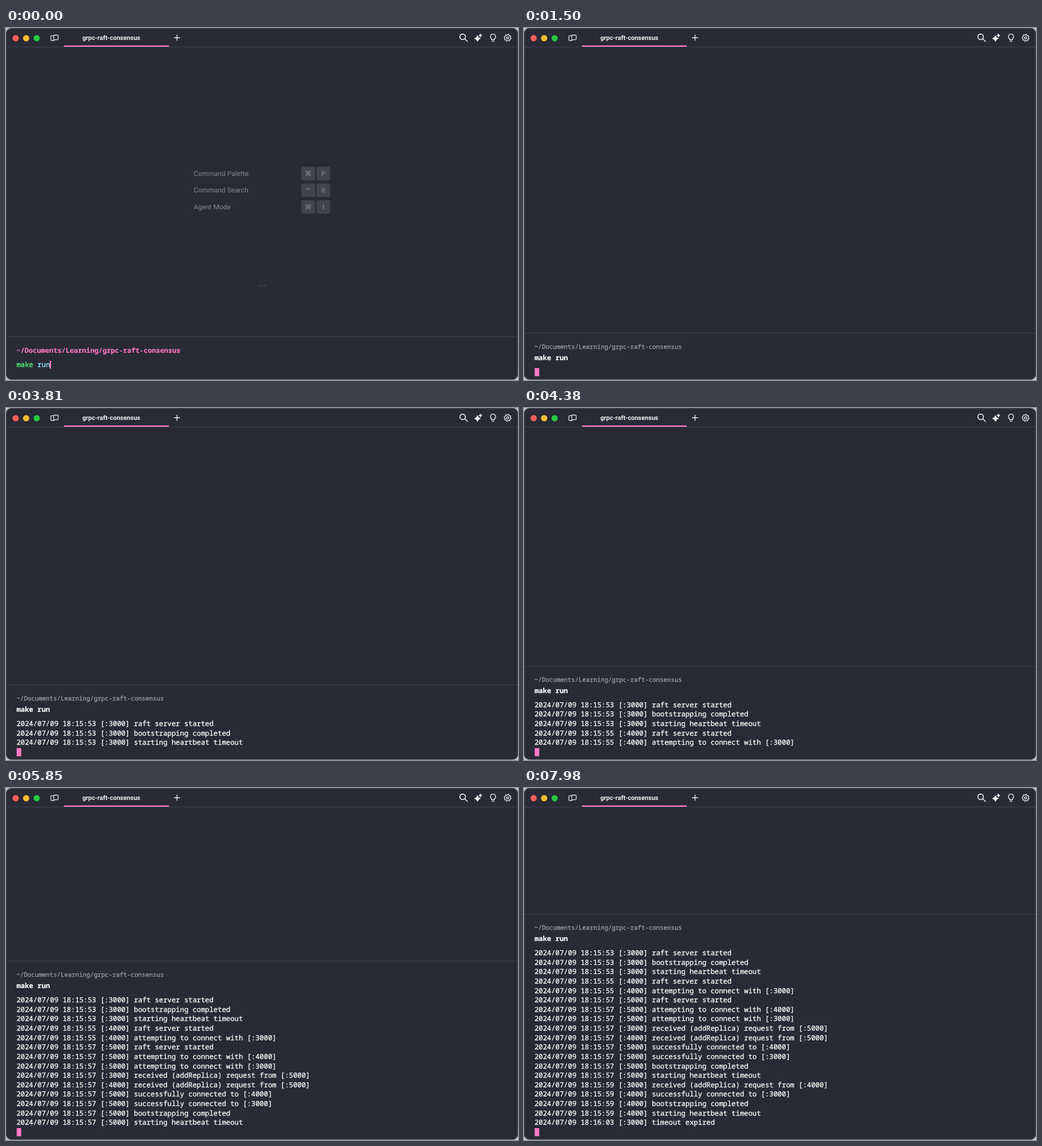
These frames come from a looping animation (902 px wide and 621 px high, 8000 ms). An HTML page with a canvas:

```html
<!DOCTYPE html>
<html lang="en">
<head>
<meta charset="utf-8">
<title>Terminal</title>
<style>
html, body { margin: 0; width: 100%; height: 100%; overflow: hidden; background: #c3c4c8; }
canvas { display: block; width: 902px; height: 621px; }
</style>
</head>
<body>
<canvas id="stage"></canvas>
<script>
const W = 902, H = 621, LOOP = 8000;
const BG = '#282a36', FG = '#f8f8f2', PINK = '#ff79c6', LINE = '#41434e', DIM = '#8a8b90';
const MONO = '"Noto Sans Mono", "DejaVu Sans Mono", monospace';
const UI = 'Roboto, Inter, sans-serif';
const LEFT = 18.4, ROW = 16.61, SIZE = 12.32;
const PATH = '~/Documents/Learning/grpc-raft-consensus';
const BLINK = 510, ENTER = 660;

const start = 'raft server started';
const boot = 'bootstrapping completed';
const beat = 'starting heartbeat timeout';
const dial = p => `attempting to connect with [:${p}]`;
const recv = p => `received (addReplica) request from [:${p}]`;
const done = p => `successfully connected to [:${p}]`;

// Each batch: time of arrival, clock, then [port, message] rows
const batches = [
  [2310, '15:53', [3000, start], [3000, boot], [3000, beat]],
  [3930, '15:55', [4000, start], [4000, dial(3000)]],
  [4710, '15:57', [5000, start], [5000, dial(4000)], [5000, dial(3000)]],
  [4950, '15:57', [3000, recv(5000)], [4000, recv(5000)], [5000, done(4000)],
    [5000, done(3000)], [5000, boot], [5000, beat]],
  [6030, '15:59', [3000, recv(4000)], [4000, done(3000)], [4000, boot], [4000, beat]],
  [7530, '16:03', [3000, 'timeout expired']]
];
const log = batches.flatMap(([at, clock, ...rows]) =>
  rows.map(([port, msg]) => ({ at, text: `2024/07/09 18:${clock} [:${port}] ${msg}` })));

const canvas = document.getElementById('stage');
const dpr = window.devicePixelRatio || 1;
canvas.width = W * dpr;
canvas.height = H * dpr;
const c = canvas.getContext('2d');
c.scale(dpr, dpr);
c.textRendering = 'geometricPrecision';

function text(str, x, y, font, color, align = 'left') {
  c.font = font;
  c.fillStyle = color;
  c.textAlign = align;
  c.fillText(str, x, y);
}

// Terminal text, with a hairline outline for a medium weight
function mono(str, x, y, color, size = SIZE, weight = 400) {
  text(str, x, y, `${weight} ${size}px ${MONO}`, color);
  c.strokeStyle = color;
  c.lineWidth = weight > 400 ? 0.15 : 0.35;
  c.lineJoin = 'round';
  c.strokeText(str, x, y);
}

function box(x, y, w, h, color, r = 0) {
  c.fillStyle = color;
  c.beginPath();
  c.roundRect(x, y, w, h, r);
  c.fill();
}

function disc(x, y, r, color) {
  c.fillStyle = color;
  c.beginPath();
  c.arc(x, y, r, 0, 7);
  c.fill();
}

function stroke(d, color = '#f0f0f0', width = 1.4) {
  c.strokeStyle = color;
  c.lineWidth = width;
  c.lineCap = c.lineJoin = 'round';
  c.stroke(new Path2D(d));
}

function sparkle(x, y, r) {
  c.fillStyle = '#f4f4f4';
  c.beginPath();
  for (let i = 0; i < 8; i++) {
    const a = i * Math.PI / 4, k = i % 2 ? r * 0.5 : r;
    c.lineTo(x + k * Math.cos(a), y + k * Math.sin(a));
  }
  c.fill();
}

function gear(x, y) {
  let d = '';
  for (let i = 0; i < 32; i++) {
    const a = (i + 0.5) * Math.PI / 16, r = i % 4 < 2 ? 6.1 : 4.9;
    d += `${i ? 'L' : 'M'}${x + r * Math.cos(a)} ${y + r * Math.sin(a)}`;
  }
  stroke(d + 'Z', '#f0f0f0', 1.25);
  stroke(`M${x - 2} ${y}a2 2 0 1 0 4 0a2 2 0 1 0 -4 0`, '#f0f0f0', 1.25);
}

function frame() {
  c.fillStyle = '#c3c4c8';
  c.fillRect(0, 0, W, H);
  box(0, 0, W, 620.4, '#454751', 9);
  box(1, 1.2, W - 2, 618.3, BG, 8.5);
}

function header() {
  box(1, 33, W - 2, 1, LINE);
  box(102, 30.8, 185, 2.2, PINK);
  disc(17, 18, 5.5, '#ff5f57');
  disc(35.5, 18, 5.5, '#febc2e');
  disc(54, 18, 5.5, '#28c840');
  stroke('M84 13.7H80.3a1.3 1.3 0 0 0 -1.3 1.3V20.7a1.3 1.3 0 0 0 1.3 1.3H84.3' +
    'a1.3 1.3 0 0 0 1.3 -1.3M85.4 12.5H90.6a1.3 1.3 0 0 1 1.3 1.3V19.4' +
    'a1.3 1.3 0 0 1 -1.3 1.3H85.4a1.3 1.3 0 0 1 -1.3 -1.3V13.8a1.3 1.3 0 0 1 1.3 -1.3Z',
    '#e4e4e6', 1.3);
  text('grpc-raft-consensus', 185.5, 21.3, `600 11.05px ${UI}`, '#f2f2f2', 'center');
  stroke('M296.6 17.2H306M301.3 12.5V21.9');
  stroke('M799.6 15.5a4.9 4.9 0 1 0 9.8 0a4.9 4.9 0 1 0 -9.8 0M808.2 19L813 23.8', '#f4f4f4', 1.6);
  sparkle(830.6, 18.6, 6);
  sparkle(835.8, 13.2, 3.6);
  stroke('M855.8 21V19.6C854.2 18.4 853.4 17 853.4 15.3a4.6 4.6 0 0 1 9.2 0' +
    'C862.6 17 861.8 18.4 860.2 19.6V21ZM856.4 23.6H859.6');
  gear(883.7, 17.3);
}

function key(x, y, label) {
  box(x, y - 12, 24.4, 24, '#41434d', 3.5);
  const mid = x + 12.2;
  if (label === '^') stroke(`M${mid - 3} ${y - 1.2}l3 -3l3 3`, DIM, 1.1);
  else text(label, mid, y + 4.2, `12px Roboto, "DejaVu Sans", sans-serif`, DIM, 'center');
}

function palette() {
  [['Command Palette', '⌘', 'P'], ['Command Search', '^', 'R'], ['Agent Mode', '⌘', 'I']]
    .forEach(([name, mod, letter], i) => {
      const y = 256.8 + i * 29.5;
      text(name, 330.6, y + 4, `12.1px ${UI}`, DIM);
      key(520.3, y, mod);
      key(547, y, letter);
    });
  for (let i = 0; i < 3; i++) disc(447 + i * 4.3, 454.6, 1, '#5c5e68');
}

function prompt(t) {
  palette();
  box(1, 544, W - 2, 1, LINE);
  mono(PATH, LEFT, 573, PINK, 12.05, 700);
  mono('make', LEFT, 598, '#50fa7b');
  mono('run', LEFT + 5 * SIZE * 0.6, 598, '#8be9fd');
  if (t < BLINK) box(77, 587, 2.4, 14, PINK);
}

function output(t) {
  const rows = log.filter(r => r.at <= t);
  const top = 610.8 - rows.length * ROW;
  box(1, Math.round(top - 73), W - 2, 1, LINE);
  mono(PATH, LEFT, top - 45.2, '#9a9b9f', 10.84);
  mono('make run', LEFT, top - 25, '#ffffff', SIZE, 700);
  rows.forEach((r, i) => mono(r.text, LEFT, top + i * ROW, FG));
  box(18.8, 600, 8, 14.4, PINK);
}

function draw(t) {
  frame();
  header();
  if (t < ENTER) prompt(t);
  else output(t);
}

const t0 = performance.now();
function tick() {
  draw((performance.now() - t0) % LOOP);
  requestAnimationFrame(tick);
}
tick();
</script>
</body>
</html>
```
